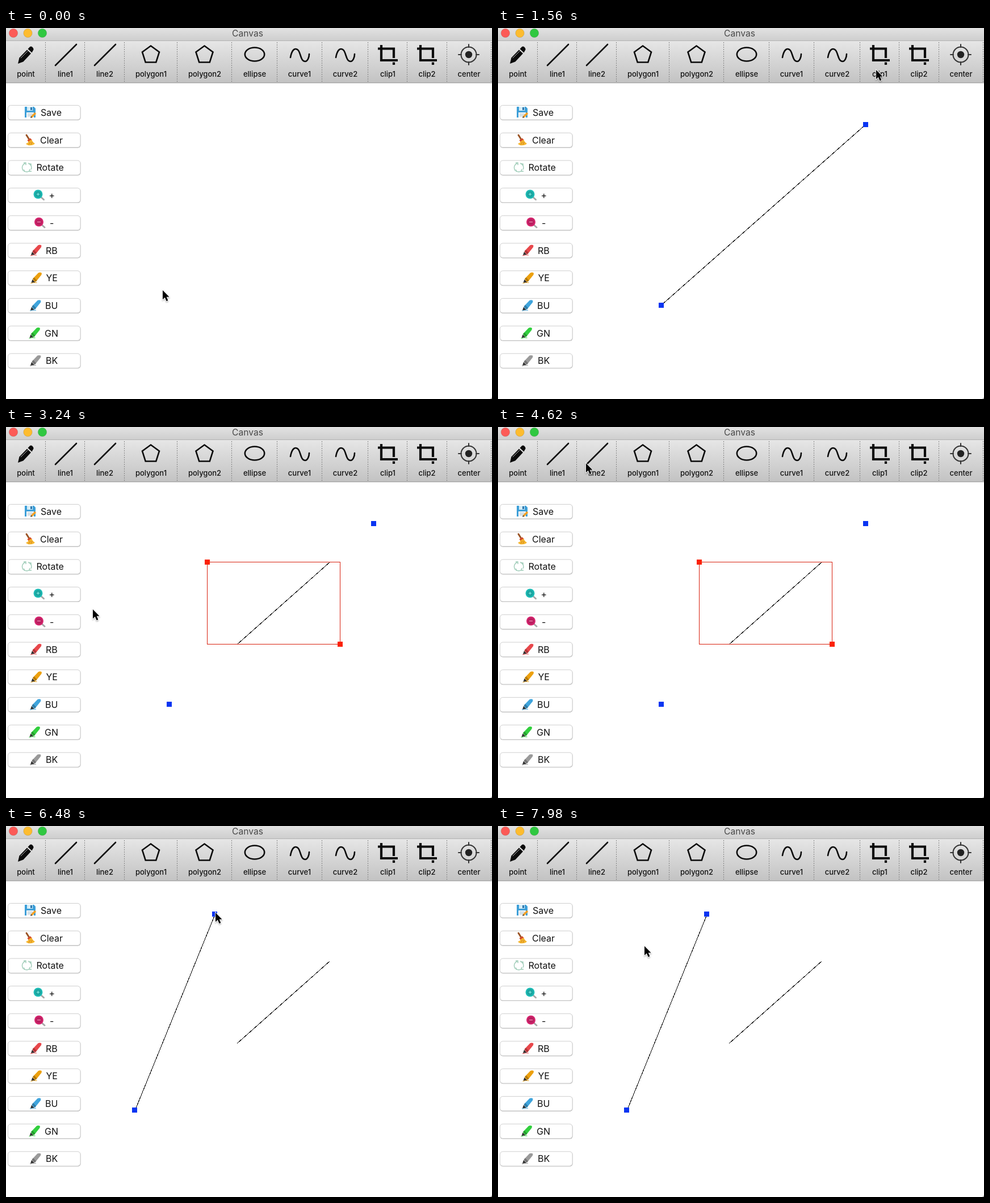
An HTML page for the animation above (8 s loop, 856 px wide and 655 px high).

```html
<!DOCTYPE html>
<html lang="en">
<head>
<meta charset="utf-8">
<title>Canvas</title>
<style>
  html, body { margin: 0; width: 100%; height: 100%; overflow: hidden; background: #fff; }
  svg { display: block; width: 100vw; height: 100vh; }
  text { font-family: Inter, Roboto, sans-serif; fill: #111; }
  .title { font-size: 15.6px; fill: #484848; text-anchor: middle; }
  .labels { font-size: 13px; font-weight: 500; text-anchor: middle; }
  .captions { font-size: 16px; }
  .icons { fill: none; stroke: #0b0b0b; stroke-width: 2.6; stroke-linecap: round; }
  .separators { fill: none; stroke: #828282; stroke-dasharray: 2 2; }
  .thin { fill: none; stroke: #000; shape-rendering: crispEdges; }
  .red { stroke: #d8200e; }
  .blue-dot { fill: #0a35f2; }
  .red-dot { fill: #fb2205; }

  .stage { animation: 8s step-end infinite; }
  .start { animation-name: start; }
  .end { animation-name: end; }
  .full { animation-name: full; }
  .corner { animation-name: corner; }
  .window { animation-name: window; }
  .clipped { animation-name: clipped; }
  .next-start { animation-name: next-start; }
  .next-end { animation-name: next-end; }
  @keyframes start { 0%, 70.5% { opacity: 0 } 4.5% { opacity: 1 } 100% { opacity: 0 } }
  @keyframes end { 0%, 70.5% { opacity: 0 } 12% { opacity: 1 } 100% { opacity: 0 } }
  @keyframes full { 0%, 33% { opacity: 0 } 12% { opacity: 1 } 100% { opacity: 0 } }
  @keyframes corner { 0%, 70.5% { opacity: 0 } 26.25% { opacity: 1 } 100% { opacity: 0 } }
  @keyframes window { 0%, 70.5% { opacity: 0 } 33% { opacity: 1 } 100% { opacity: 0 } }
  @keyframes clipped { 0% { opacity: 0 } 33%, 100% { opacity: 1 } }
  @keyframes next-start { 0% { opacity: 0 } 70.5%, 100% { opacity: 1 } }
  @keyframes next-end { 0% { opacity: 0 } 79.5%, 100% { opacity: 1 } }

  .cursor { animation: travel 8s ease-in-out infinite; }
  @keyframes travel {
    0% { transform: translate(276px, 463px) }
    3%, 5% { transform: translate(287px, 488px) }
    11.25%, 12.75% { transform: translate(648px, 168px) }
    17.5%, 21% { transform: translate(666px, 74px) }
    25.5%, 27% { transform: translate(355px, 237px) }
    32%, 34% { transform: translate(589px, 382px) }
    40.5%, 46% { transform: translate(153px, 322px) }
    56%, 59.5% { transform: translate(155px, 64px); animation-timing-function: ease-in }
    66.75% { transform: translate(201px, 411px); animation-timing-function: ease-out }
    69.5%, 71.5% { transform: translate(228px, 499px) }
    78.75%, 81.75% { transform: translate(369px, 153px) }
    89%, 92% { transform: translate(741px, 66px) }
    99.75%, 100% { transform: translate(258px, 212px) }
  }
</style>
</head>
<body>
<svg viewBox="0 0 856 655" preserveAspectRatio="none">
  <defs>
    <linearGradient id="titleFill" x2="0" y2="1">
      <stop stop-color="#e2e2e2"/><stop offset="1" stop-color="#cecece"/>
    </linearGradient>
    <linearGradient id="barFill" x2="0" y2="1">
      <stop stop-color="#e6e6e6"/><stop offset="1" stop-color="#c3c3c3"/>
    </linearGradient>
    <filter id="shadow" x="-50%" y="-50%" width="200%" height="200%">
      <feDropShadow dx="0" dy="1.5" stdDeviation="1.2" flood-opacity=".35"/>
    </filter>
    <g id="button">
      <rect x="3.5" y="-12" width="128" height="26" rx="5" fill="#b9b9b9"/>
      <rect x="3.5" y="-12.5" width="127.5" height="25.5" rx="5" fill="#fff" stroke="#cfcfcf"/>
    </g>
    <g id="marker">
      <path d="M-10 9Q-5 7 1 8" fill="none" stroke="currentColor"/>
      <path d="M-9 8L-7 2L-2 7Z" fill="#333"/>
      <path d="M-6.5 1L3.5-9.5Q7-11 9.5-9L9-6L-1 6.5Q-5 6-6.5 1Z" fill="currentColor"/>
      <path d="M-6.5 1L-4-1.5L1 4L-1 6.5Z" fill="#000" opacity=".25"/>
    </g>
    <g id="lens">
      <path d="M5 5L10 9.5" stroke="#a8a8a8" stroke-width="3" stroke-linecap="round"/>
      <circle r="8" fill="currentColor"/>
      <circle r="6" fill="#000" opacity=".12"/>
    </g>
    <path id="pentagon" d="M0-15L15-4L9.3 14H-9.3L-15-4Z"/>
    <path id="wave" d="M-16 5C-14-6-10-10-7-10C3-10 0 12 10 12C14 12 17 5 17-1"/>
    <g id="crop" stroke-width="4.2" stroke-linecap="butt">
      <path d="M-11-17V10H18M-17-10.5H11V6"/><path d="M11 13.5V18"/>
    </g>
    <rect id="dot" x="-4" y="-5" width="9" height="9" shape-rendering="crispEdges"/>
  </defs>

  <rect width="856" height="655" fill="#fff"/>
  <rect width="856" height="22" fill="url(#titleFill)"/>
  <rect y="22" width="856" height="1" fill="#b3b3b3"/>
  <rect y="23" width="856" height="73" fill="url(#barFill)"/>
  <rect y="96" width="856" height="1.4" fill="#a3a3a3"/>
  <g stroke-opacity=".12" stroke="#000">
    <circle cx="13" cy="9" r="7.7" fill="#fc5b57"/>
    <circle cx="38.5" cy="9" r="7.7" fill="#fdbc2f"/>
    <circle cx="64" cy="9" r="7.7" fill="#30c841"/>
  </g>
  <text class="title" x="425.5" y="15">Canvas</text>

  <path class="separators" d="M69.5 25V95M138.5 25V95M208.5 25V95M301.5 25V95M397.5 25V95M477.5 25V95M556.5 25V95M637.5 25V95M706.5 25V95M776.5 25V95M854.5 25V95"/>
  <g class="icons">
    <g fill="#0b0b0b" stroke="none">
      <path d="M21 63L23.5 52.5L37 38.5L44 45L30.5 59.5Z"/>
      <path d="M38.5 37L42 33.3Q44 31.5 46 33.3L48 35.5Q49.3 37.5 47.5 40L45.5 43.5Z"/>
      <path d="M26 53L38 41" stroke="#c9c9c9" stroke-width=".9"/>
    </g>
    <path d="M87 66L124 29M156 66L193 29"/>
    <use href="#pentagon" x="255" y="46.5"/>
    <use href="#pentagon" x="349.5" y="46.5"/>
    <ellipse cx="438" cy="46.5" rx="17.2" ry="12"/>
    <use href="#wave" x="517" y="47"/>
    <use href="#wave" x="597" y="47"/>
    <use href="#crop" x="672" y="47"/>
    <use href="#crop" x="741" y="47"/>
    <g stroke="#333" stroke-width="2">
      <circle cx="815" cy="47" r="13.5"/>
      <path d="M815 29V34M815 60V65M797 47H802M828 47H833"/>
      <circle cx="815" cy="47" r="6.2" fill="#222" stroke="none"/>
    </g>
  </g>
  <g class="labels">
    <text x="35" y="86">point</text>
    <text x="104.5" y="86">line1</text>
    <text x="174" y="86">line2</text>
    <text x="255.5" y="86">polygon1</text>
    <text x="350" y="86">polygon2</text>
    <text x="438" y="86">ellipse</text>
    <text x="517" y="86">curve1</text>
    <text x="597.5" y="86">curve2</text>
    <text x="672.5" y="86">clip1</text>
    <text x="741.5" y="86">clip2</text>
    <text x="815.5" y="86">center</text>
  </g>

  <use href="#button" y="149"/>
  <use href="#button" y="197.7"/>
  <use href="#button" y="246.4"/>
  <use href="#button" y="295.1"/>
  <use href="#button" y="343.8"/>
  <use href="#button" y="392.5"/>
  <use href="#button" y="441.2"/>
  <use href="#button" y="489.9"/>
  <use href="#button" y="538.6"/>
  <use href="#button" y="587.3"/>

  <g>
    <path d="M33 139H49L52 142V158H33Z" fill="#3d9fd8"/>
    <path d="M37 139H47V146H37Z" fill="#d5edf8"/>
    <path d="M43 140H46V145H43Z" fill="#2e77ad"/>
    <path d="M36 149H49V158H36Z" fill="#f3f6f8"/>
    <path d="M38 152H47M38 155H45" stroke="#9ab8c8"/>
    <path d="M45 157L52 150" stroke="#f3a126" stroke-width="3.5"/>
    <path d="M43 159L44 155.5L46.5 158Z" fill="#564637"/>
  </g>
  <g>
    <path d="M36 189L41 197" stroke="#9b5426" stroke-width="3" stroke-linecap="round"/>
    <path d="M37.5 198L43 194.5L46 198L40 202Z" fill="#d44c2b"/>
    <path d="M39.5 200.5L45 197Q47 202 51 204Q47 208 39 207Q36 206 35 204Q39 203 39.5 200.5Z" fill="#f5b52d"/>
    <path d="M40 206L43 201M44 206L46 201" stroke="#cc8525"/>
  </g>
  <g fill="none" stroke="#9dcbb7" stroke-width="1.4">
    <path d="M30 251A8 8 0 0 1 34 238.8M39 238.7A8 8 0 0 1 44 250M41 252.5A8 8 0 0 1 32 252.5"/>
    <path d="M31 238H35V242M44 243V240H40M29 251H32V254M42 249L41 253L45 253"/>
  </g>
  <use href="#lens" x="56.5" y="293.5" color="#1fbeb8"/>
  <path d="M54 293.5H59M56.5 291V296" stroke="#8ceae2"/>
  <use href="#lens" x="58" y="342.5" color="#d7256f"/>
  <path d="M55 342.5H61" stroke="#f4a1c2"/>
  <use href="#marker" x="53" y="393" color="#e8474b"/>
  <use href="#marker" x="53.5" y="441.7" color="#eca00f"/>
  <use href="#marker" x="52" y="490.4" color="#3fa4dc"/>
  <use href="#marker" x="50.5" y="539" color="#32cf3e"/>
  <use href="#marker" x="52" y="587.8" color="#9a9a9a"/>
  <g class="captions">
    <text x="61" y="155">Save</text>
    <text x="60" y="203.7">Clear</text>
    <text x="53.5" y="252.4">Rotate</text>
    <text x="75.5" y="301">+</text>
    <text x="77" y="349.8">-</text>
    <text x="70" y="398.5">RB</text>
    <text x="70.5" y="447.2">YE</text>
    <text x="69" y="495.9">BU</text>
    <text x="68" y="544.6">GN</text>
    <text x="70" y="593.3">BK</text>
  </g>
  <path d="M856 652L853 655H856Z" fill="#aaa"/>

  <path class="stage full thin" d="M287.5 489.5L647.5 170.5"/>
  <path class="stage clipped thin" d="M407.5 383.5L570.5 238.5"/>
  <use class="stage start blue-dot" href="#dot" x="287" y="490"/>
  <use class="stage end blue-dot" href="#dot" x="647" y="171"/>
  <rect class="stage window thin red" x="354.5" y="238.5" width="234" height="145"/>
  <use class="stage corner red-dot" href="#dot" x="354" y="239"/>
  <use class="stage window red-dot" href="#dot" x="588" y="384"/>
  <path class="stage next-end thin" d="M227.5 501.5L368.5 155.5"/>
  <use class="stage next-start blue-dot" href="#dot" x="226" y="502"/>
  <use class="stage next-end blue-dot" href="#dot" x="367" y="156"/>

  <g class="cursor">
    <path d="M0 0V16.3L3.8 12.8L6.6 19.3L9.4 18.1L6.7 11.8H11.5Z" fill="#000" stroke="#fff" stroke-width="1.6" paint-order="stroke" filter="url(#shadow)"/>
  </g>
</svg>
</body>
</html>
```
